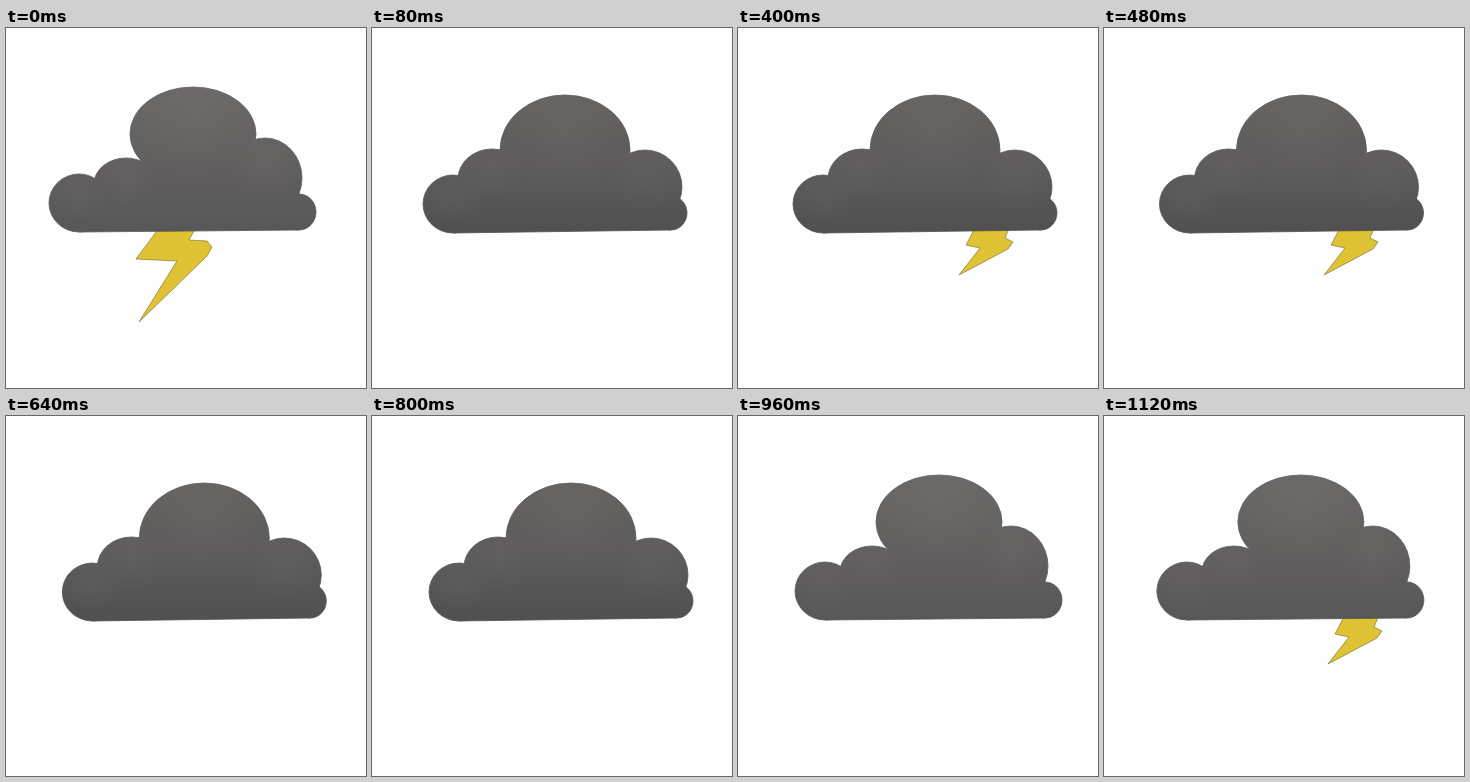
An HTML page with a canvas that plays this animation: 360 px wide and 360 px high, repeating every 1.2 s.

```html
<!DOCTYPE html>
<html lang="en">
<head>
<meta charset="utf-8">
<title>Storm cloud</title>
<style>
  html, body { margin: 0; width: 100%; height: 100%; overflow: hidden; background: #fefefe; }
  canvas { display: block; width: 360px; height: 360px; }
</style>
</head>
<body>
<canvas id="stage" width="360" height="360"></canvas>
<script>
const ctx = document.getElementById('stage').getContext('2d');
const STEP = 80, COUNT = 15;

// A cloud is a row of round puffs, left to right, on a flat base.
const puff = (x, y, rx, ry) => ({ x, y, rx, ry });
const tall = {
  left: 53,
  puffs: [puff(83, 175, 30, 29), puff(130, 156, 32, 26), puff(197, 106, 63, 47),
          puff(269, 150, 37, 40), puff(303, 184, 17, 18)],
  tones: ['#6a6767', '#625f5f', '#585757']
};
const wide = {
  left: 53,
  puffs: [puff(83, 176, 30, 29), puff(122, 151, 34, 30), puff(195, 122, 65, 55),
          puff(275, 159, 37, 37), puff(301, 185, 16, 17)],
  tones: ['#656260', '#5d5b5b', '#515050']
};

const bigBolt = [[164, 200], [200, 200], [191, 216], [209, 217], [214, 223], [209, 232], [141, 298], [179, 237], [138, 235]];
const smallBolt = [[237, 198], [271, 198], [266, 210], [274, 214], [269, 221], [220, 247], [241, 220], [227, 217]];

function outline(puffs) {
  const path = new Path2D();
  const first = puffs[0], last = puffs[puffs.length - 1];
  for (const p of puffs) path.lineTo(p.x, p.y);
  path.lineTo(last.x, last.y + last.ry);
  path.lineTo(first.x, first.y + first.ry);
  path.closePath();
  for (const p of puffs) {
    path.moveTo(p.x + p.rx, p.y);
    path.ellipse(p.x, p.y, p.rx, p.ry, 0, 0, 2 * Math.PI);
  }
  return path;
}

function cloud({ left, puffs, tones }, x) {
  const path = outline(puffs);
  const crown = puffs[2];
  const fill = ctx.createLinearGradient(0, crown.y - crown.ry, 0, 205);
  tones.forEach((tone, i) => fill.addColorStop(i / 2, tone));

  ctx.save();
  ctx.translate(x - left, 0);
  ctx.strokeStyle = 'rgba(65,63,63,.7)';
  ctx.lineWidth = 1;
  ctx.stroke(path);
  ctx.fillStyle = fill;
  ctx.fill(path);
  ctx.clip(path);
  for (const p of puffs.slice(0, 4)) {
    const r = p.rx, y = p.y - p.ry * .3;
    const glow = ctx.createRadialGradient(p.x, y, 0, p.x, y, r);
    glow.addColorStop(0, 'rgba(190,180,175,.05)');
    glow.addColorStop(1, 'rgba(190,180,175,0)');
    ctx.fillStyle = glow;
    ctx.fillRect(p.x - r, y - r, 2 * r, 2 * r);
  }
  ctx.restore();
}

function bolt(points, dx, dy) {
  ctx.save();
  ctx.translate(dx, dy);
  ctx.beginPath();
  for (const [x, y] of points) ctx.lineTo(x, y);
  ctx.closePath();
  ctx.fillStyle = '#dfc335';
  ctx.fill();
  ctx.strokeStyle = 'rgba(100,88,35,.6)';
  ctx.lineWidth = .9;
  ctx.lineJoin = 'round';
  ctx.stroke();
  ctx.restore();
}

function draw(i) {
  ctx.fillStyle = '#fefefe';
  ctx.fillRect(0, 0, 360, 360);

  const isTall = i === 0 || i > 10;
  if (i < 5 && i !== 1) bolt(bigBolt, isTall ? -8 : 0, isTall ? -4 : 0);
  if (i >= 3 && i <= 6) bolt(smallBolt, 6 - i, 0);
  if (i >= 13) bolt(smallBolt, 4, 1);

  if (isTall) {
    // Rests on the right, then speeds up leftwards into the next loop.
    const back = Math.max(0, ((i || COUNT) - 12) / 3);
    cloud(tall, 57 - 14 * back ** 3);
  } else {
    cloud(wide, 51 + 2 * Math.sqrt(i - 1));
  }
}

const start = performance.now();
function tick() {
  draw(Math.floor((performance.now() - start) / STEP) % COUNT);
  requestAnimationFrame(tick);
}
tick();
</script>
</body>
</html>
```
